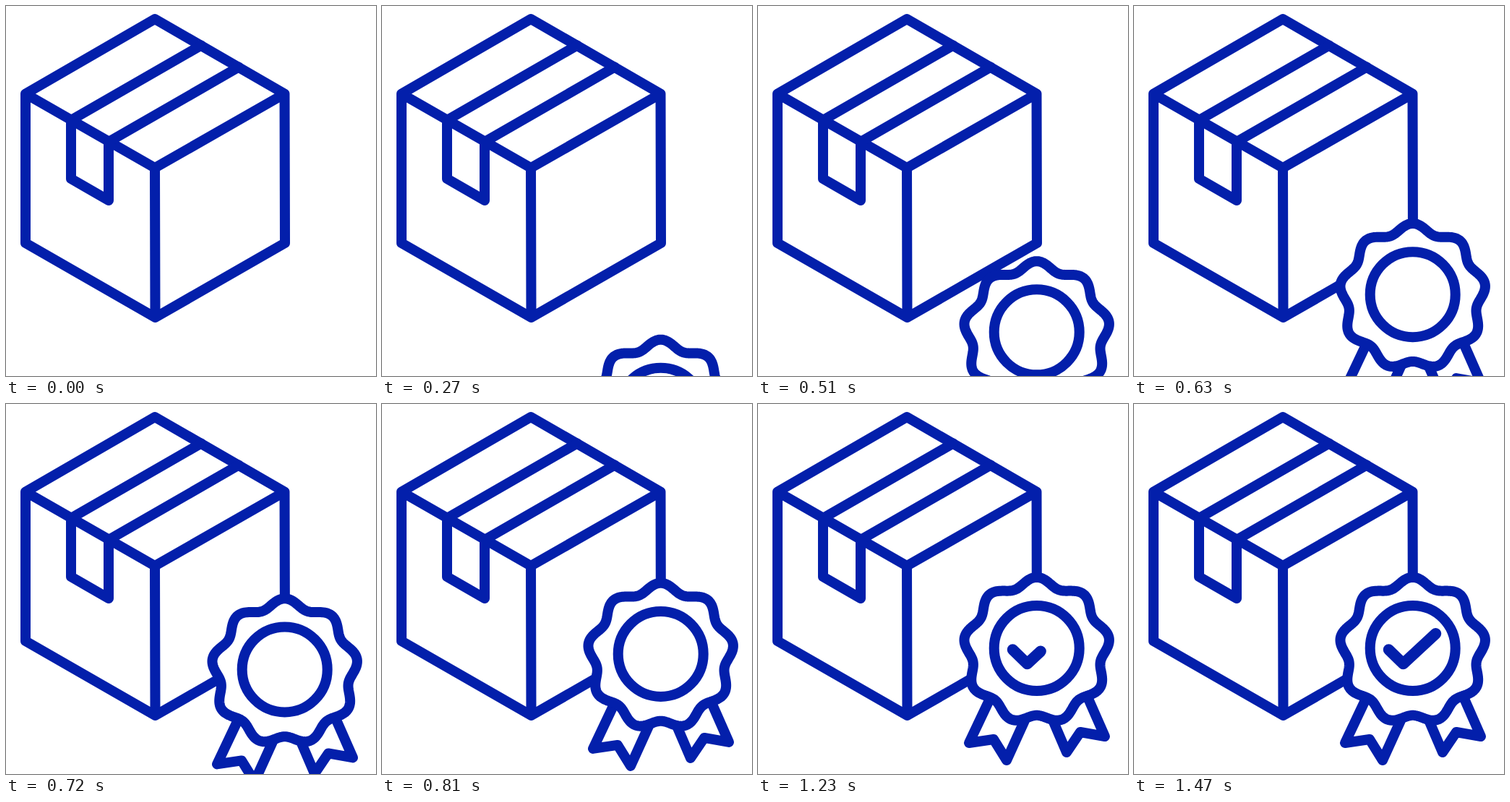
An HTML page that plays this animation: 512 px wide and 512 px high, repeating every 1.8 s.

```html
<!DOCTYPE html>
<html lang="en">
<head>
<meta charset="utf-8">
<title>Certified parcel</title>
<style>
  html, body { margin: 0; height: 100%; overflow: hidden; background: #fff; }
  svg { display: block; width: 100vw; height: 100vh; }
  svg * { stroke: #031fab; stroke-width: 14; stroke-linecap: round; stroke-linejoin: round; }
</style>
</head>
<body>
<svg viewBox="0 0 512 512" fill="none">
  <path d="M206 18 385.5 121.5 386 328 206.5 431 27 328V121.5ZM27 121.5 206 224 385.5 121.5M206 224 206.5 431"/>
  <path d="M270 54.5 90 158V239L142 269V188L322 84.5"/>
  <g id="badge">
    <path d="M319 412 292 469 326 464 344 493 369 438"/>
    <path d="M458 410 480 460 446 454 427 482 409 440"/>
    <path id="rosette" fill="#fff"/>
    <circle cx="385.7" cy="338" r="59"/>
    <path id="check" d="M352.5 340 372.5 359.5 417.5 317.7" pathLength="1" style="stroke-width:15.5"/>
  </g>
</svg>
<script>
  const LOOP = 1800, STEP = 30, DROP = 283;
  const badge = document.getElementById('badge');
  const check = document.getElementById('check');

  const progress = (t, start, end) => Math.min(1, Math.max(0, (t - start) / (end - start)));
  const smooth = u => u * u * (3 - 2 * u);

  // Nine-lobed wavy outline
  const outline = Array.from({ length: 360 }, (_, deg) => {
    const a = deg * Math.PI / 180;
    const r = 95.5 + 6 * Math.cos(9 * a);
    return `${(385.7 + r * Math.sin(a)).toFixed(2)} ${(341.3 - r * Math.cos(a)).toFixed(2)}`;
  });
  document.getElementById('rosette').setAttribute('d', `M${outline.join('L')}Z`);

  function draw(now) {
    const t = Math.floor(now % LOOP / STEP) * STEP;
    const rise = smooth(progress(t, 0, 900));
    const drawn = progress(t, 875, 1470);
    badge.setAttribute('transform', `translate(0 ${DROP * (1 - rise)})`);
    check.style.visibility = drawn > 0 ? 'visible' : 'hidden';
    check.style.strokeDasharray = `${drawn} 2`;
    requestAnimationFrame(draw);
  }
  draw(performance.now());
</script>
</body>
</html>
```
